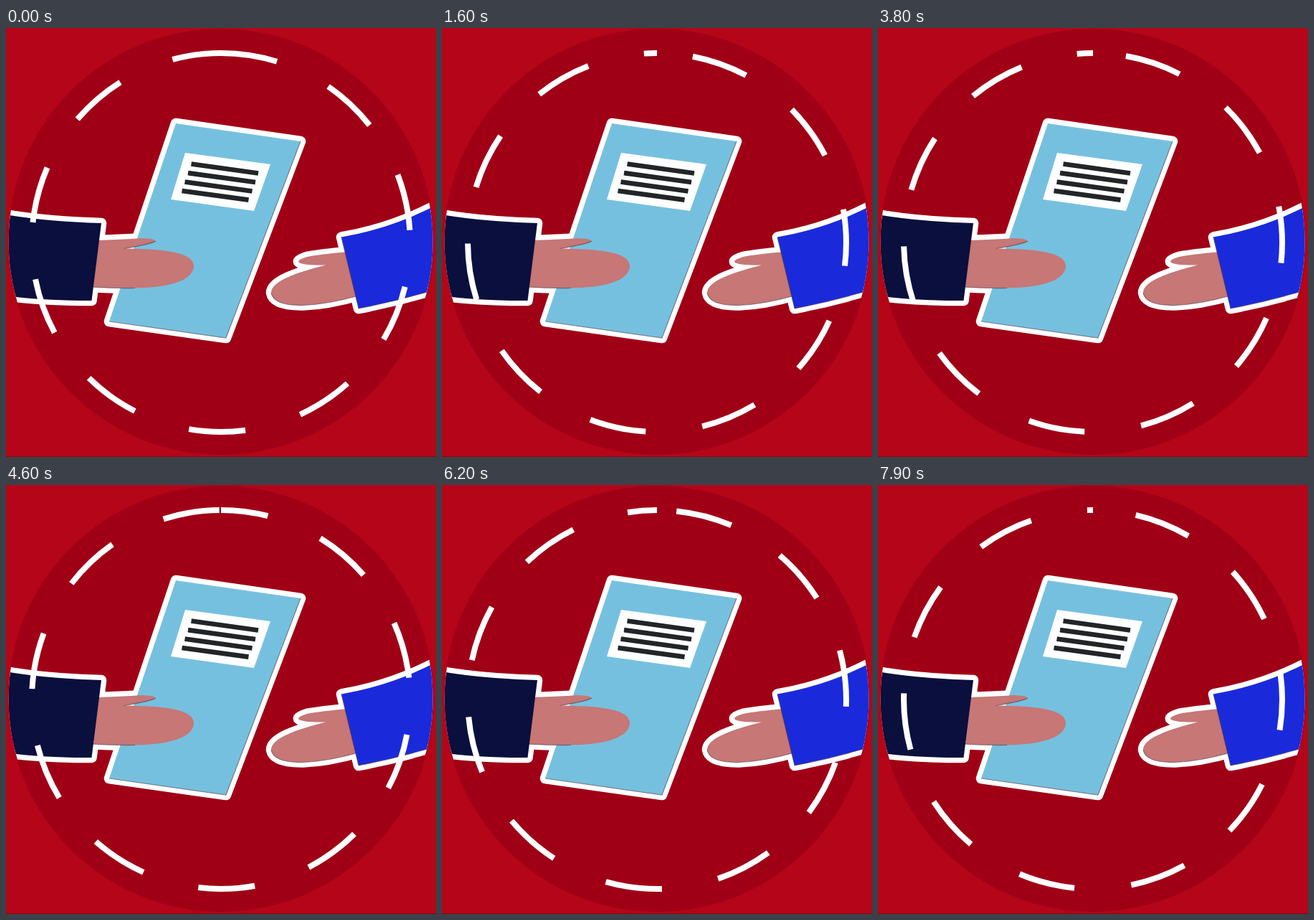
These frames come from a looping animation (600 px wide and 598 px high, 8 s). An HTML page:

```html
<!DOCTYPE html>
<html lang="en">
<head>
<meta charset="utf-8">
<title>Handing over a document</title>
<style>
  html, body { margin: 0; width: 100%; height: 100%; overflow: hidden; background: #b50518; }
  svg { display: block; width: 100%; height: 100%; }
  .edge { fill: #fff; stroke: #fff; stroke-width: 14.6; stroke-linejoin: round; }
  .skin { fill: #c67776; }
  .shade { fill: none; stroke: #40303c; stroke-opacity: .55; stroke-width: 1.2; }
  .lines { stroke: #212527; stroke-width: 6.8; }
  #ring { fill: none; stroke: #fff; stroke-width: 8; }
</style>
</head>
<body>
<svg viewBox="0 0 600 598" preserveAspectRatio="none">
  <defs>
    <clipPath id="disc"><circle cx="299.600" cy="298" r="296"/></clipPath>
    <path id="handL" d="M122 296 Q160 295 190 293 Q207 293.500 209 297 Q203 301 165 307.500 C215 308 262 311 262 332 C261 354 222 362 180 362.500 Q150 363 116 361Z"/>
    <path id="handR" d="M478 312 Q440 315 420 319 Q407 323 408 326 Q412 331 446 330.500 C405 341 370 353 370 369 C372 382 390 387 415 386.500 Q450 385 492 373Z"/>
    <path id="folder" d="M237 133 L411 158 L307 432 L144 409Z"/>
    <path id="sleeveL" d="M-20 259 L5 261 Q60 270 133 272 L119.500 380 Q60 380 14 375 L-20 372Z"/>
    <path id="sleeveR" d="M468 291.500 Q535 280 594 250 L625 235 L625 358 L588 368 Q540 382 492 391Z"/>
  </defs>

  <rect width="600" height="598" fill="#b50518"/>
  <rect y="597" width="600" height="1" fill="#8c0413"/>
  <circle cx="300" cy="298" r="297" fill="#a00016"/>

  <g clip-path="url(#disc)">
    <use href="#handL" class="edge"/>
    <use href="#sleeveL" class="edge"/>
    <use href="#folder" class="edge"/>
    <use href="#folder" fill="#76c0df"/>
    <path class="shade" d="M411 158 L307 432 L144 409"/>
    <path d="M250 174 L369 190 L346 255 L230 239Z" fill="#fff"/>
    <path class="lines" d="M258.500 189.500 L352 202.500 M254 202 L348 215 M249.500 214.500 L343.500 227.500 M245.500 227 L338.500 239.700"/>
    <use href="#handL" class="skin"/>
    <path class="shade" d="M120 361 Q150 363 180 362.500 M209 297 Q203 301 165 307.500"/>
    <use href="#sleeveL" fill="#0a0f3d"/>

    <use href="#handR" class="edge"/>
    <use href="#sleeveR" class="edge"/>
    <use href="#handR" class="skin"/>
    <path class="shade" d="M370 369 C372 382 390 387 415 386.500 Q450 385 492 373"/>
    <use href="#sleeveR" fill="#1a2adb"/>
    <path class="shade" d="M468 291.500 L492 391 Q540 382 588 368"/>
  </g>

  <circle id="ring" cx="300" cy="299" r="264" transform="rotate(-90 300 299)"/>
</svg>
<script>
  const LOOP = 8000, STEP = 100, RAMP = 262;
  const pxPerDeg = 264 * Math.PI / 180;
  const speed = 0.01608 * pxPerDeg; // px per ms, anticlockwise
  const ring = document.getElementById('ring');
  ring.style.strokeDasharray = [17.2, 17.3].map(deg => deg * pxPerDeg).join(' ');

  // Short run-up, then constant speed.
  const travel = t => speed * (t < RAMP ? t * t / (2 * RAMP) : t - RAMP / 2);

  const frames = Array.from({ length: LOOP / STEP + 1 }, (_, i) => ({
    offset: i * STEP / LOOP,
    strokeDashoffset: travel(i * STEP) + 'px',
    easing: 'step-end'
  }));
  ring.animate(frames, { duration: LOOP, iterations: Infinity });
</script>
</body>
</html>
```
